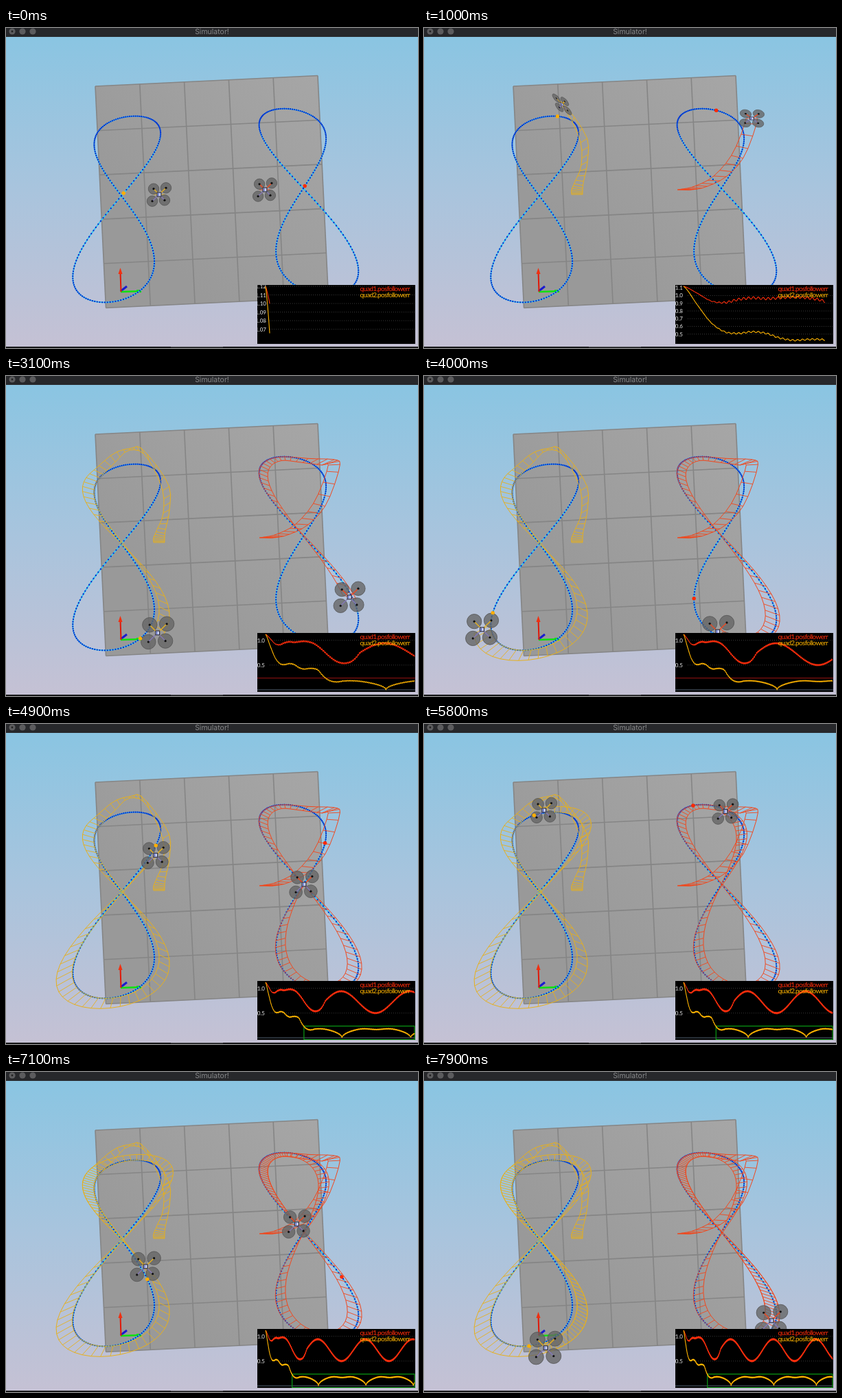
An HTML page with a canvas for the animation above (8 s loop, 600x467 px).

```html
<!DOCTYPE html>
<html lang="en">
<head>
<meta charset="utf-8">
<title>Simulator!</title>
<style>
  html, body { margin: 0; height: 100%; overflow: hidden; background: #000; }
  canvas { display: block; }
</style>
</head>
<body>
<canvas id="stage" width="600" height="467"></canvas>
<script>
const c = document.getElementById('stage').getContext('2d');
const TAU = Math.PI * 2, LOOP = 8, PERIOD = 4.53, RUNG = 0.06;
const mix = (a, b, k) => a + (b - a) * k;
const smooth = (a, b, x) => {
  const k = Math.min(1, Math.max(0, (x - a) / (b - a)));
  return k * k * (3 - 2 * k);
};

// Catmull-Rom through evenly spaced values
function spline(vals, s) {
  const last = vals.length - 1;
  const i = Math.min(last - 1, Math.max(0, Math.floor(s)));
  const f = Math.min(1, s - i);
  const at = n => vals[Math.min(last, Math.max(0, n))];
  const [p, q, r, t] = [at(i - 1), at(i), at(i + 1), at(i + 2)];
  return q + 0.5 * f * (r - p + f * (2 * p - 5 * q + 4 * r - t + f * (3 * (q - r) + t - p)));
}

// x, y: crossing; lean, roll: perspective of the eight; outer, inner: [u gain, v gain, x shift]
// start: trail edges [outer x, y, inner x, y] every 0.2 s during take-off
const quads = [
  { x: 433, y: 234, lean: -25, roll: 4, lag: 0.37, color: '#f0481e', dot: '#ff2a00',
    outer: [1.05, 1, 2], inner: [0.75, 0.95, 0], tilt: 0.22, squash: 0.7,
    start: [[385, 236, 369, 236], [390, 236, 376, 235], [410, 232, 394, 231],
      [440, 217, 422, 216], [467, 186, 450, 182], [486, 132, 469, 132],
      [478, 122, 460, 130], [445, 120, 435, 127], [412, 119, 412, 130]] },
  { x: 168, y: 245, lean: 14, roll: -5, lag: 0.09, color: '#e6b01e', dot: '#ffae00',
    outer: [1.38, 1.08, 0], inner: [1.07, 1, 3], tilt: 0.85, squash: 0.4,
    start: [[231, 243, 215, 243], [231, 238, 215, 236], [232, 226, 220, 224],
      [238, 195, 229, 200], [236, 157, 227, 163], [199, 107, 203, 116],
      [180, 106, 180, 108], [148, 110, 155, 121], [122, 128, 135, 133]] }
];

function eight(q, phase, [gu, gv, dx] = [1, 1, 0]) {
  const u = Math.sin(2 * phase) * gu, v = Math.sin(phase) * gv, w = 1 + 0.144 * v;
  return [q.x + dx + (53 * u + q.lean * v) / w, q.y + (q.roll * u - 132.7 * v) / w];
}

function trailAt(q, t) {
  const phase = TAU * (t - q.lag) / PERIOD;
  const steady = [...eight(q, phase, q.outer), ...eight(q, phase, q.inner)];
  const k = smooth(1.2, 1.6, t);
  if (k === 1) return steady;
  return steady.map((p, i) => mix(spline(q.start.map(s => s[i]), t / 0.2), p, k));
}

function line(points, color, width = 1) {
  c.beginPath();
  points.forEach(([x, y]) => c.lineTo(x, y));
  c.strokeStyle = color;
  c.lineWidth = width;
  c.stroke();
}

function disc(x, y, r, color) {
  c.beginPath();
  c.arc(x, y, r, 0, TAU);
  c.fillStyle = color;
  c.fill();
}

function box(x, y, w, h, color) {
  c.fillStyle = color;
  c.fillRect(x, y, w, h);
}

function text(str, x, y, color, font, align) {
  c.font = font;
  c.textAlign = align;
  c.fillStyle = color;
  c.fillText(str, x, y);
}

function drawScene() {
  const sky = c.createLinearGradient(0, 13, 0, 467);
  sky.addColorStop(0, '#8ac5e2');
  sky.addColorStop(0.5, '#a9c4dd');
  sky.addColorStop(1, '#c5c1d4');
  box(0, 0, 600, 467, sky);

  const ground = (u, v) => [130 + 324 * u + 15.5 * v, 85 - 15.5 * u + 323.5 * v];
  const stone = c.createLinearGradient(454, 70, 200, 300);
  stone.addColorStop(0, '#a6a6a6');
  stone.addColorStop(1, '#999');
  c.beginPath();
  [[0, 0], [1, 0], [1, 1], [0, 1]].forEach(p => c.lineTo(...ground(...p)));
  c.fillStyle = stone;
  c.fill();
  for (let i = 0; i <= 5; i++) {
    line([ground(i / 5, 0), ground(i / 5, 1)], '#858585', 1.6);
    line([ground(0, i / 5), ground(1, i / 5)], '#858585', 1.6);
  }
}

function drawAxes() {
  line([[167, 384], [176, 377]], '#1a1ad0', 3);
  line([[167, 385], [197, 384]], '#10e010', 2.5);
  line([[190, 384], [197, 384]], '#10e010', 4);
  line([[167.5, 385], [166.5, 356]], '#e01808', 2);
  c.beginPath();
  [[166.5, 350], [169.5, 359], [163.5, 359]].forEach(p => c.lineTo(...p));
  c.fillStyle = '#f03010';
  c.fill();
}

function drawPath(q) {
  const n = 200;
  const points = Array.from({ length: n + 1 }, (_, i) => eight(q, TAU * i / n));
  line(points, '#38c4f0', 1.9);
  points.forEach(([x, y]) => disc(x, y, 1.15, '#0828c8'));
}

function drawTrail(q, t) {
  const outer = [], inner = [];
  const add = s => {
    const [a, b, d, e] = trailAt(q, s);
    outer.push([a, b]);
    inner.push([d, e]);
  };
  for (let s = 0; s < t; s += RUNG) add(s);
  add(t);
  line(outer, q.color);
  line(inner, q.color);
  outer.forEach((p, i) => line([p, inner[i]], q.color, 0.9));
}

function drawQuad(q, t) {
  const [a, b, d, e] = trailAt(q, t);
  const x = (a + d) / 2, y = (b + e) / 2;
  const arm = mix(9, 11, smooth(0, 1.2, t)) * (1 + (y - 245) / 1000);
  const flat = mix(1, q.squash, Math.exp(-(((t - 1) / 0.25) ** 2)));
  c.save();
  c.translate(x, y);
  c.rotate(q.tilt);
  c.scale(1, flat);
  c.rotate(-q.tilt);
  for (const sy of [-1, 1]) for (const sx of [-1, 1]) {
    const px = sx * arm - sy, py = sy * arm - sx * 0.7;
    disc(px, py, arm * 0.86, 'rgba(100,100,100,.78)');
    c.strokeStyle = '#555';
    c.lineWidth = 0.8;
    c.stroke();
    line([[0, 0], [px, py]], sy < 0 ? q.color : '#8478b8', 1.4);
    disc(px, py, 1.6, '#111');
  }
  box(-3.5, -3.5, 7, 7, '#334');
  box(-2.3, -2.3, 4.6, 4.6, '#c8d0f0');
  line([[-1, -2], [-1, 2]], '#3848c0');
  c.restore();
}

// Position errors: start-up values every 0.1 s, then a steady swing
const startErr = [
  [1.12, 1.03, 0.93, 0.91, 0.95, 0.97, 0.96, 0.97, 0.98, 0.97, 0.94, 0.88, 0.8, 0.71,
    0.63, 0.57, 0.54, 0.54, 0.57, 0.65, 0.76],
  [1.12, 0.88, 0.65, 0.53, 0.51, 0.53, 0.51, 0.45, 0.42, 0.43, 0.43, 0.4, 0.29, 0.21,
    0.17, 0.16, 0.17]
];
const steadyErr = [
  t => 0.72 + 0.22 * Math.cos(TAU * (t - 2.5) / 2.27),
  t => {
    const s = Math.abs(Math.sin(Math.PI * (t - 2.53) / 2.27));
    return 0.21 * Math.sqrt(s) * (1 - 0.2 * s ** 8);
  }
];
function errorAt(i, t) {
  const s = t * 10, known = startErr[i];
  const base = s < known.length - 1 ? spline(known, s) : steadyErr[i](t);
  const wobble = (i ? 0.01 : 0.016) * Math.sin(TAU * 28 * t) * smooth(0.1, 0.4, t);
  return Math.max(0, base + wobble);
}

function drawPlot(t) {
  const end = t + 0.03, perSec = Math.min(200, 217 / end), limit = 0.237;
  const n = Math.ceil(end * 170) + 4;
  const times = Array.from({ length: n + 1 }, (_, i) => end * i / n);
  const data = [0, 1].map(i => times.map(s => errorAt(i, s)));
  const top = 1.12, low = Math.max(0, Math.min(...data[1]) - 0.01), range = top - low;
  const X = s => 378 + s * perSec;
  const Y = v => 377 + 81 * (top - v) / range;

  box(366, 375, 230, 86, '#000');
  c.save();
  c.beginPath();
  c.rect(366, 375, 230, 86);
  c.clip();

  const step = range < 0.08 ? 0.01 : range < 0.25 ? 0.05 : range < 0.9 ? 0.1 : 0.5;
  const digits = step < 0.1 ? 2 : 1;
  for (let k = Math.floor(top / step + 1e-6); k > 0; k--) {
    const y = Y(k * step);
    if (y > 449) break;
    c.setLineDash([1, 2]);
    line([[384, y], [595, y]], '#3a3a3a');
    c.setLineDash([]);
    text((k * step).toFixed(digits), digits > 1 ? 379 : 377, y + 3, '#eee', '8px Lato, sans-serif', 'right');
  }
  line([[366, Y(0)], [596, Y(0)]], '#506070');
  if (t > 4.27) {
    c.strokeStyle = '#0a9a14';
    c.lineWidth = 1.2;
    c.strokeRect(X(1.27), Y(limit), 595 - X(1.27), 460.5 - Y(limit));
  } else {
    line([[366, Y(limit)], [596, Y(limit)]], '#a01414');
  }
  c.letterSpacing = '-0.7px';
  ['#ff2e0c', '#ffb400'].forEach((color, i) => {
    line(data[i].map((v, k) => [X(times[k]), Y(v)]), color, 1.1);
    text(`quad${i + 1}.posfollowerr`, 588, 384 + 9 * i, color, '10px Lato, sans-serif', 'right');
  });
  c.letterSpacing = '0px';
  c.restore();
}

function drawWindow() {
  box(0, 0, 600, 13, '#27282b');
  [9, 24, 39].forEach(x => disc(x, 5, 4.6, '#5c5c5e'));
  disc(9, 5, 1.4, '#222');
  text('Simulator!', 300, 9, '#88898b', '10.5px Inter, sans-serif', 'center');
  box(0, 465, 600, 2, '#18181a');
  box(240, 465, 76, 1, '#55565a');
}

function draw(now) {
  // the view refreshes ten times a second
  const t = Math.floor((now / 1000 % LOOP) * 10 + 1e-6) / 10;
  c.lineJoin = 'round';
  drawScene();
  drawAxes();
  quads.forEach(drawPath);
  quads.forEach(q => drawTrail(q, t));
  quads.forEach(q => drawQuad(q, t));
  quads.forEach(q => disc(...eight(q, TAU * (t + 0.02) / PERIOD), 2.7, q.dot));
  drawPlot(t);
  drawWindow();
}

const began = performance.now();
function tick() {
  draw(performance.now() - began);
  requestAnimationFrame(tick);
}
tick();
</script>
</body>
</html>
```
